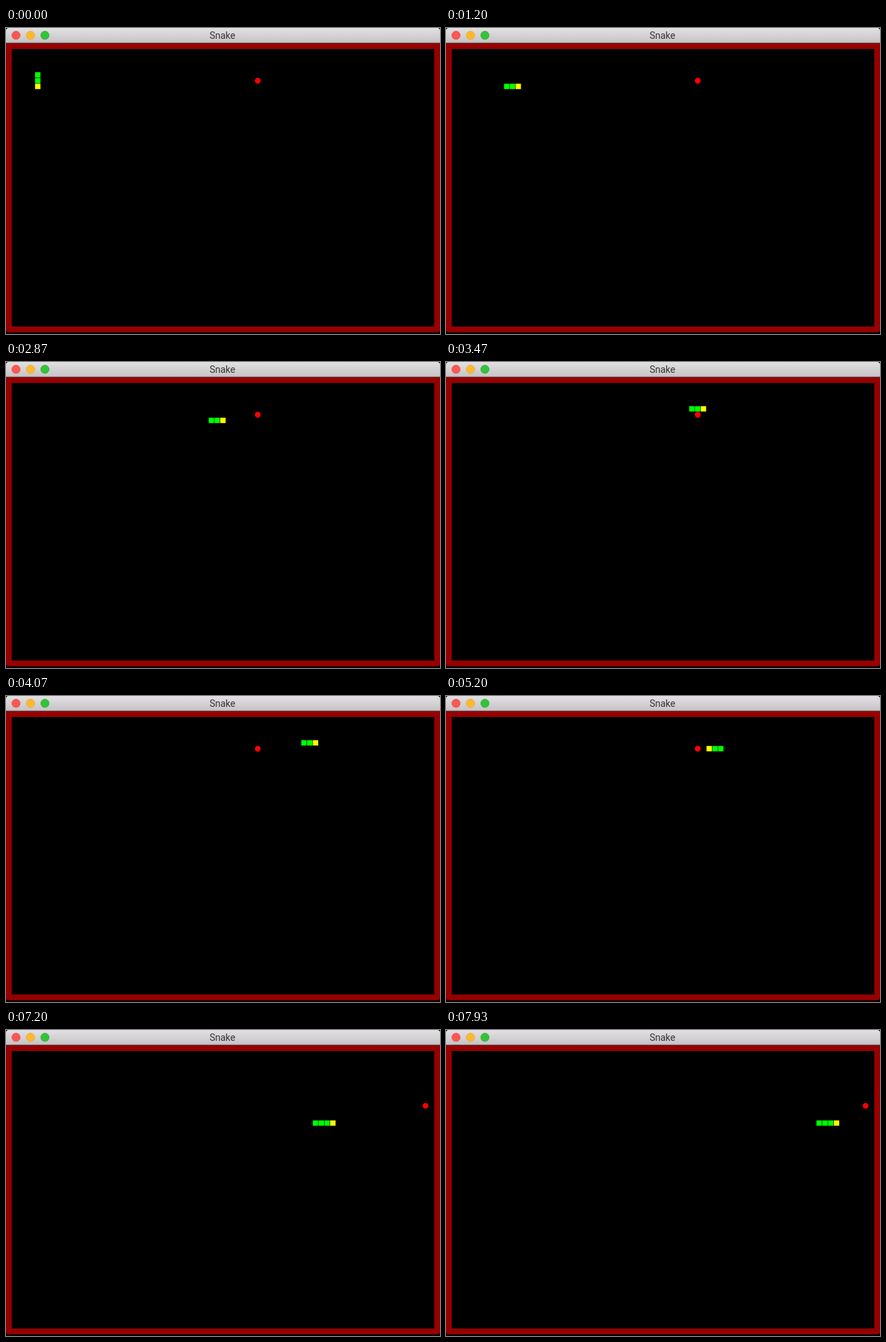
An HTML page for the animation above (8000 ms loop, 640 px wide and 452 px high).

```html
<!DOCTYPE html>
<html lang="en">
<head>
<meta charset="utf-8">
<title>Snake</title>
<style>
  html, body { margin: 0; width: 100%; height: 100%; overflow: hidden; background: #000; }
  svg { display: block; width: 640px; height: 452px; }
  text { font: 14px Roboto, sans-serif; fill: #363436; text-anchor: middle; }
</style>
</head>
<body>
<svg viewBox="0 0 640 452">
  <defs>
    <linearGradient id="bar" x2="0" y2="1">
      <stop offset="0" stop-color="#e2e0e2"/>
      <stop offset="1" stop-color="#c5c3c5"/>
    </linearGradient>
  </defs>
  <path d="M0 22.4H640V445.5Q640 449.4 636 449.4H4Q0 449.4 0 445.5Z" fill="#960000"/>
  <rect x="8.5" y="31" width="623" height="410" fill="#000"/>
  <path d="M0 22V4Q0 0 4 0H636Q640 0 640 4V22Z" fill="url(#bar)"/>
  <rect y="21.7" width="640" height="0.9" fill="#6b4a4b"/>
  <g stroke-width="0.6">
    <circle cx="14.8" cy="10.8" r="6.2" fill="#fc5753" stroke="#df4744"/>
    <circle cx="36.1" cy="10.8" r="6.2" fill="#fdb92d" stroke="#de9f34"/>
    <circle cx="57.4" cy="10.8" r="6.2" fill="#33c339" stroke="#27aa35"/>
  </g>
  <text x="319.2" y="15.8">Snake</text>
  <g id="snake"></g>
  <circle id="apple" r="4.3" fill="#f00"/>
</svg>
<script>
const CELL = 640 / 75, TOP = 22.4;
const LOOP = 8000, STEP = 200 / 3, LAST = 119;
const FIRST_MOVE = 11, EATEN = 80;

const DIRS = { R: [1, 0], L: [-1, 0], U: [0, -1], D: [0, 1] };
const path = [[5, 5]];
for (const leg of "D2 R35 U2 R17 D1 L18 D4 R10 D3 R18".split(" ")) {
  const [dx, dy] = DIRS[leg[0]];
  for (let n = +leg.slice(1); n > 0; n--) {
    const [x, y] = path[path.length - 1];
    path.push([x + dx, y + dy]);
  }
}

const apple = document.getElementById("apple");
const snake = document.getElementById("snake");
const cells = ["#ff0", "#0f0", "#0f0", "#0f0"].map(fill => {
  const rect = document.createElementNS("http://www.w3.org/2000/svg", "rect");
  rect.setAttribute("width", 7.9);
  rect.setAttribute("height", 7.9);
  rect.setAttribute("fill", fill);
  return snake.appendChild(rect);
});

function set(el, attrs) {
  for (const name in attrs) el.setAttribute(name, attrs[name]);
}

function draw(tick) {
  const head = 2 + Math.max(0, tick - FIRST_MOVE);
  const eaten = tick >= EATEN;
  const length = eaten ? 4 : 3;
  cells.forEach((cell, i) => {
    const [x, y] = path[Math.max(0, head - i)];
    set(cell, {
      x: x * CELL + 0.2,
      y: TOP + y * CELL + 0.2,
      visibility: i < length ? "visible" : "hidden"
    });
  });
  const [ax, ay] = eaten ? [72, 10] : [43, 6];
  set(apple, { cx: (ax + 0.5) * CELL, cy: TOP + (ay + 0.5) * CELL });
}

const start = performance.now();
function frame() {
  const t = (performance.now() - start) % LOOP;
  draw(Math.min(LAST, Math.floor((t + 5) / STEP)));
  requestAnimationFrame(frame);
}
frame();
</script>
</body>
</html>
```
